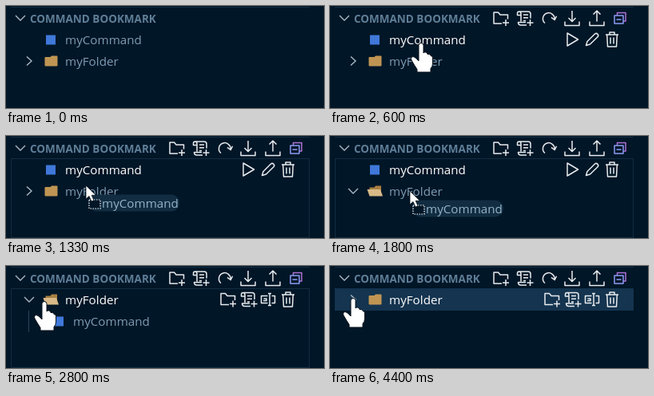
Write an HTML page that moves like this. It is 398x128 px and loops after 5540 ms.

```html
<!DOCTYPE html>
<html lang="en">
<head>
<meta charset="utf-8">
<title>Command bookmark tree</title>
<style>
  html, body { margin: 0; width: 100%; height: 100%; overflow: hidden; background: #011627; }
  svg { display: block; width: 398px; height: 128px; }
  text { font: 15.2px "Open Sans", "Noto Sans", sans-serif; white-space: pre; }
  .head { font-size: 13.5px; font-weight: 700; fill: #5f7e97; }
  .icon { fill: none; stroke: #e8ebee; stroke-width: 1.5; stroke-linejoin: round; }
  .chevron { fill: none; stroke: #a9b8c4; stroke-width: 1.4; }
</style>
</head>
<body>
<svg id="stage" viewBox="0 0 398 128"></svg>
<script>
const LOOP = 5540;
const DIM = "#7f9cb3", LIT = "#ffffff";
const ROW1 = 42, ROW2 = 69;

// Stroke icons, centred on 0,0
const ICONS = {
  addFolder: "M1 6.5H-9V-7.5H-3.5L-1 -4.5H8.5V1M6 1.5V9.5M2 5.5H10",
  addScript: "M-5 4V-5.5Q-5 -8.5 -7.5 -8.5Q-9.5 -8.5 -9.5 -6V-4H-5M-7.5 -8.5H4Q7 -8.5 7 -5.5V0" +
    "M-2 -4.5H4M-2 -.8H4M-2 3H1M1 5H-8.5Q-8.5 8.5 -5 8.5H2M6.5 1.5V9.5M2.5 5.5H10.5",
  refresh: "M-5 6A7.3 7.3 0 1 1 7 1M3 -1.2L7.2 2L9.5 -2.8",
  download: "M-9 4V9H9V4M0 -9.5V4M-4.5 -.5L0 4L4.5 -.5",
  upload: "M-9 4V9H9V4M0 4V-9.5M-4.5 -5L0 -9.5L4.5 -5",
  rename: "M-.5 -4.5H-8.5V4.5H-.5M4.5 -4.5H8.5V4.5H4.5M2 -7.5V7.5M0 -7.5H4M0 7.5H4M-6 1.5H-2V-1H-5.5",
  trash: "M-8 -6H8M-3 -6V-9H3V-6M-6.3 -6L-5.5 9H5.5L6.3 -6M-2 -2.5V5.5M2 -2.5V5.5",
  play: "M-6 -8L7.5 0L-6 8Z",
  edit: "M-7.5 7.5L-6 2.5L3.5 -7Q5.3 -8.3 7 -6.8Q8.5 -5 7 -3.3L-2.5 6Z"
};
const TOOLBAR = [["addFolder", 214], ["addScript", 244], ["refresh", 274], ["download", 303], ["upload", 334]];
const FOLDER_TOOLS = [["addFolder", 278], ["addScript", 304], ["rename", 328], ["trash", 353]];
const COMMAND_TOOLS = [["play", 303], ["edit", 328], ["trash", 353]];

// Pointer tip: [ms, x, y]
const PATH = [
  [130, 386, 118], [200, 310, 101], [270, 232, 82], [330, 177, 66], [400, 150, 58],
  [470, 133, 53], [530, 122, 50], [600, 114, 47], [670, 109, 46], [730, 107, 45],
  [800, 105, 44], [930, 104, 44], [1130, 103, 47], [1200, 102, 53], [1270, 100, 59],
  [1330, 100, 62], [1400, 100, 65], [1470, 100, 67], [1530, 100, 69],
  [2530, 99, 75], [2600, 91, 82], [2670, 77, 76], [2730, 62, 60], [2800, 48, 45],
  [2870, 36, 41], [2930, 28, 40], [3000, 27, 40], [3070, 29, 41]
];

const at = (x, y, body) => `<g transform="translate(${x} ${y})">${body}</g>`;
const label = (x, y, s, fill) => `<text x="${x}" y="${y}" fill="${fill}">${s}</text>`;
const tools = (list, y) => list.map(([name, x]) => at(x, y, `<path class="icon" d="${ICONS[name]}"/>`)).join("");
const chevron = (x, y, open) =>
  at(x, y, `<path class="chevron" d="${open ? "M-6 -3L0 3L6 -3" : "M-3 -5.5L3 0L-3 5.5"}"/>`);

const collapseAll = at(363, 15,
  `<path class="icon" style="stroke:#b072d8" d="M-3.5 -3V-6.5H7V4H4"/>
   <path class="icon" style="stroke:#8c9cf5" d="M-7 -3H4V7H-7ZM-4.5 2H1.5"/>`);

const closedFolder = `<path fill="#c09553" d="M-8 -4Q-8 -5 -7 -5H-1L.5 -6.5H7Q8 -6.5 8 -5.5V5.5Q8 6.5 7 6.5H-7Q-8 6.5 -8 5.5Z"/>`;
const openFolder = `<path fill="#a87f42" d="M-7 -4.5H-1L.5 -6.5H7.5V6H-7Z"/>
  <path fill="#d8b987" d="M-10 -2H6.5L9.5 6.5H-7Z"/>`;

const hand = `<path fill="#fff" stroke="#06101a" stroke-width="1" stroke-linejoin="round"
  d="M-3 2.5Q-3 -.5 0 -.5Q3 -.5 3 2.5V12Q4 10.5 6 11Q8 11.5 8 13.5Q11 12.5 12 15.5Q14.5 15.5 14.5 18V25Q14.5 29 12 31.5V36H-5V32.5Q-8 28 -12 21Q-13.5 17 -10 16.5Q-7 17 -3 22Z"/>`;
const arrow = `<rect x="4" y="18" width="14" height="11" fill="#011627" stroke="#fff" stroke-width="1.2" stroke-dasharray="1.5 1.5"/>
  <path fill="#fff" stroke="#06101a" stroke-width=".8" d="M0 0V17L4 13.5L7 20L10 18.7L7.2 12.3H12.5Z"/>`;
const dragLabel = `<rect x="3" y="11.5" width="114" height="21" rx="10.5" fill="#122d42"/>` +
  label(20, 28, "myCommand", "#93b3c8");

function command(x, y, lit) {
  return `<rect x="${x - 24}" y="${y - 5.5}" width="12" height="12" fill="#3f78d9"/>` +
    label(x, y + 6, "myCommand", lit ? LIT : DIM) + (lit ? tools(COMMAND_TOOLS, y) : "");
}

function folder(y, open, lit) {
  return chevron(29, y, open) + at(56.5, y, open ? openFolder : closedFolder) +
    label(74, y + 6, "myFolder", lit ? LIT : DIM) + (lit ? tools(FOLDER_TOOLS, y) : "");
}

function child(lit) {
  return `<path d="M28.5 56V83" stroke="#29465a"/>` + command(84, ROW2, lit);
}

function scene(t) {
  const tip = PATH.filter(p => p[0] <= t).pop();
  const y = tip ? tip[2] : 999;
  const dragging = t >= 1130 && t < 1870;
  const moved = t >= 1930, selected = t >= 3400;
  const onFirst = y >= 28 && y < 56, onSecond = y >= 56 && y < 83;

  let out = `<rect width="398" height="128" fill="#011627"/><path d="M6 1.5H380" stroke="#122d42"/>`;
  if (selected) out += `<rect x="6" y="28" width="374" height="28" fill="#14344f"/>`;
  else if (t >= 1130) out += `<rect x="6.5" y="28.5" width="373" height="99" fill="none" stroke="#122d42"/>`;

  out += chevron(18, 15, true) + `<text class="head" x="30" y="21">COMMAND BOOKMARK</text>`;
  if (tip) out += tools(TOOLBAR, 15.5) + collapseAll;

  if (moved) {
    const open = !selected || (t >= 3930 && t < 4400);
    out += folder(ROW1, open, onFirst) + (open ? child(onSecond) : "");
  } else {
    const held = t >= 1130;
    out += command(74, ROW1, held || onFirst) + folder(ROW2, t >= 1800, !held && onSecond);
  }
  if (tip) out += at(tip[1], y, dragging ? dragLabel + arrow : hand);
  return out;
}

const stage = document.getElementById("stage");
const start = performance.now();
let shown = "";
function tick() {
  const next = scene((performance.now() - start) % LOOP);
  if (next !== shown) stage.innerHTML = shown = next;
  requestAnimationFrame(tick);
}
tick();
</script>
</body>
</html>
```
